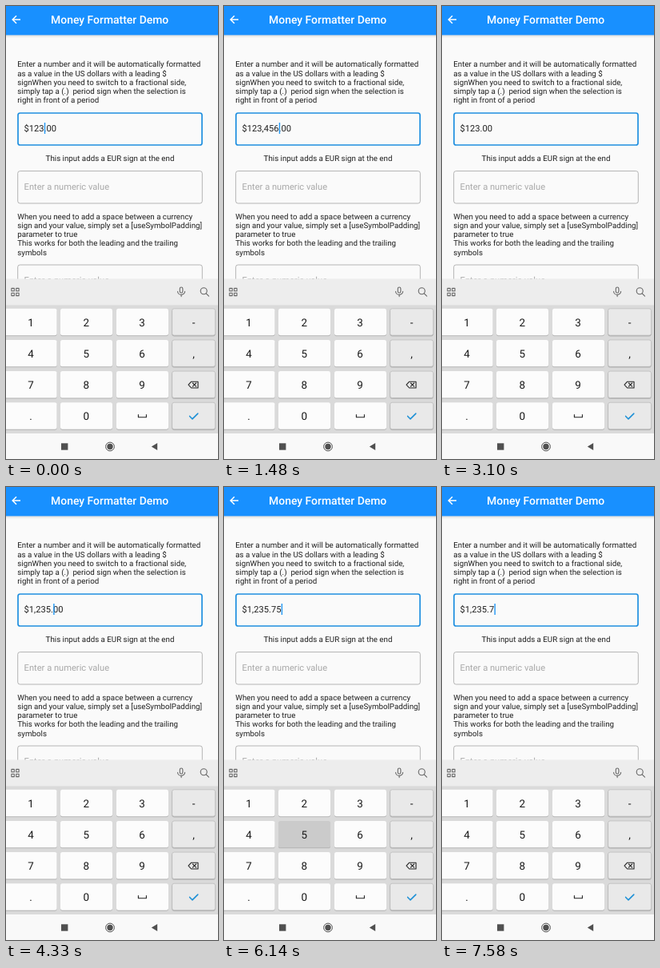
Write an HTML page that moves like this. It is 265 by 567 pixels and loops after 8 s.

```html
<!DOCTYPE html>
<html lang="en">
<head>
<meta charset="utf-8">
<title>Money Formatter Demo</title>
<style>
  html, body { margin: 0; width: 100%; height: 100%; overflow: hidden; background: #fafafa; }
  svg { display: block; width: 100%; height: 100%; }
  text { font-family: Roboto, "Noto Sans", sans-serif; fill: #202020; text-rendering: geometricPrecision; white-space: pre; }
  .title { font-size: 13.93px; font-weight: 500; fill: #fff; }
  .body { font-size: 9.75px; }
  .value, .hint { font-size: 11.14px; }
  .hint { fill: #a8a8a8; }
  .field { fill: none; stroke: #a2a2a2; stroke-width: .8; }
  .focus { stroke: #1f8fe0; stroke-width: 1.7; }
  .caret { fill: #2196f3; }
  .key rect { fill: #fcfcfc; }
  .key.side rect { fill: #e9e9e9; stroke: #b0b0b0; stroke-width: .6; }
  .key .edge { fill: #b2b2b2 !important; }
  .key.down rect { fill: #cbcbcb; }
  .key text { font-size: 13.4px; text-anchor: middle; fill: #181818; }
  .icon { fill: none; stroke: #666; stroke-width: 1.1; stroke-linecap: round; stroke-linejoin: round; }
</style>
</head>
<body>
<svg viewBox="0 0 265 567" preserveAspectRatio="none">
  <defs>
    <linearGradient id="shade" x2="0" y2="1">
      <stop stop-color="#000" stop-opacity=".13"/>
      <stop offset="1" stop-color="#000" stop-opacity="0"/>
    </linearGradient>
  </defs>
  <rect width="265" height="567" fill="#fafafa"/>

  <rect y="36" width="265" height="4" fill="url(#shade)"/>
  <rect width="265" height="36.4" fill="#1890ff"/>
  <path d="M18 17H8.6M13 12.2L8.2 17l4.8 4.8" fill="none" stroke="#fff" stroke-width="1.5"/>
  <text class="title" x="56.1" y="21.9">Money Formatter Demo</text>

  <g id="copy"></g>
  <text class="body" x="130" y="193.6" text-anchor="middle">This input adds a EUR sign at the end</text>

  <rect class="field focus" x="15" y="134" width="230" height="40" rx="2.6"/>
  <rect class="field" x="14.7" y="206.6" width="230.6" height="40.4" rx="2.8"/>
  <rect class="field" x="14.7" y="324" width="230.6" height="40.4" rx="2.8"/>
  <text class="hint" x="22.6" y="230.2">Enter a numeric value</text>
  <text class="hint" x="22.6" y="347.4">Enter a numeric value</text>
  <text class="value" x="22.6" y="157"><tspan id="head"></tspan><tspan id="tail"></tspan></text>
  <rect id="caret" class="caret" y="146" width="1.4" height="14"/>

  <rect y="341.5" width="265" height="33" fill="#ededed"/>
  <rect y="374.3" width="265" height="161" fill="#dadada"/>
  <rect y="535" width="265" height="32" fill="#f9f9f9"/>

  <path class="icon" d="M6.9 353.4h3.4v3.4h-3.4zM12.7 353.4h3.4v3.4h-3.4zM6.9 359.2h3.4v3.4h-3.4zM12.7 359.2h3.4v3.4h-3.4z"/>
  <g class="icon">
    <rect x="217.3" y="352" width="3.6" height="7" rx="1.8"/>
    <path d="M214.6 357.2a4.5 4.2 0 0 0 9 0M219.1 361.4v2.2"/>
    <circle cx="247.2" cy="356.8" r="4"/>
    <path d="M250.2 359.8l3.3 3.3"/>
  </g>

  <g id="keys"></g>
  <g class="icon" style="stroke:#222">
    <path d="M231.6 470.2h8.4v7.8h-8.4l-3.6-3.9zM233.4 472l4.2 4.2m0-4.2l-4.2 4.2"/>
    <path d="M165.4 511.6v3.2h10v-3.2"/>
    <path d="M229.6 513.4l3.4 3.5 6.8-6.8" stroke="#1a8fd6" stroke-width="1.5"/>
  </g>

  <rect x="69" y="547.3" width="8.4" height="8.4" fill="#505050"/>
  <circle cx="130" cy="551.5" r="5.4" fill="none" stroke="#505050" stroke-width="1"/>
  <circle cx="130" cy="551.5" r="3.7" fill="#505050"/>
  <path d="M189.2 547v9l-7.4-4.5z" fill="#505050"/>
</svg>
<script>
const LOOP = 8000;
const $ = id => document.getElementById(id);

// Paragraphs
const lead = 11.27;
const paragraphs = [
  [76.4, ["Enter a number and it will be automatically formatted",
    "as a value in the US dollars with a leading $",
    "signWhen you need to switch to a fractional side,",
    "simply tap a (.)  period sign when the selection is",
    "right in front of a period"]],
  [266.6, ["When you need to add a space between a currency",
    "sign and your value, simply set a [useSymbolPadding]",
    "parameter to true",
    "This works for both the leading and the trailing",
    "symbols"]]
];
$("copy").innerHTML = paragraphs.map(([y, lines]) => lines.map((line, i) =>
  `<text class="body" x="14.3" y="${y + i * lead}">${line}</text>`).join("")).join("");

// Keypad: [left, right, label centre] per column
const columns = [[-6, 63.6, 31], [68, 133, 100.3], [138, 203, 170], [207.6, 261.6, 234.6]];
const rows = [["1", "2", "3", "-"], ["4", "5", "6", ","], ["7", "8", "9", "del"], [".", "0", "space", "ok"]];
const keys = {};
$("keys").innerHTML = rows.map((row, r) => row.map((name, c) => {
  const [left, right, mid] = columns[c], y = 378.8 + r * 39.15;
  const box = `x="${left}" width="${right - left}" height="33.4" rx="2.6"`;
  const label = name.length > 1 ? "" : `<text x="${mid}" y="${401.2 + r * 38.95}">${name}</text>`;
  return `<g class="key${c === 3 ? " side" : ""}" data-key="${name}">` +
    `<rect class="edge" ${box} y="${y + 1}"/><rect ${box} y="${y}"/>${label}</g>`;
}).join("")).join("");
document.querySelectorAll(".key").forEach(k => keys[k.dataset.key] = k);

// [time, text before caret, text after caret]
const edits = [
  [0, "$123", ".00"], [480, "$1,234", ".00"], [780, "$12,345", ".00"], [1050, "$123,456", ".00"],
  [2070, "$123,45", ".00"], [2370, "$123,4", ".00"], [2500, "$123", ".00"],
  [3280, "$1,235", ".00"], [4270, "$1,235.", "00"],
  [4810, "$1,235.7", "0"], [4990, "$1,235.75", ""], [7480, "$1,235.7", ""]
];
// [key, pressed, released]
const taps = [
  ["4", 340, 480], ["5", 640, 780], ["6", 880, 1050],
  ["del", 1940, 2270], ["del", 2320, 2430], ["del", 2480, 2560],
  ["5", 3160, 3280], [".", 4210, 4330], ["7", 4720, 4840], ["5", 4900, 4990],
  ["5", 6140, 6200], ["5", 6440, 6480], ["del", 7410, 7580]
];
// Spans with the caret hidden
const blinks = [[1600, 2000], [3100, 3280], [3840, 4270], [5540, 6030], [6640, 7190]];

let shown;
function draw(t) {
  const edit = edits.findLast(e => e[0] <= t);
  if (edit !== shown) {
    shown = edit;
    $("head").textContent = edit[1];
    $("tail").textContent = edit[2];
    $("caret").setAttribute("x", 22.8 + $("head").getComputedTextLength());
  }
  const within = ([from, to]) => t >= from && t < to;
  $("caret").style.visibility = blinks.some(within) ? "hidden" : "visible";
  const down = taps.find(([, ...span]) => within(span));
  for (const name in keys) keys[name].classList.toggle("down", !!down && down[0] === name);
}

const start = performance.now();
function tick() {
  draw((performance.now() - start) % LOOP);
  requestAnimationFrame(tick);
}
tick();
</script>
</body>
</html>
```
